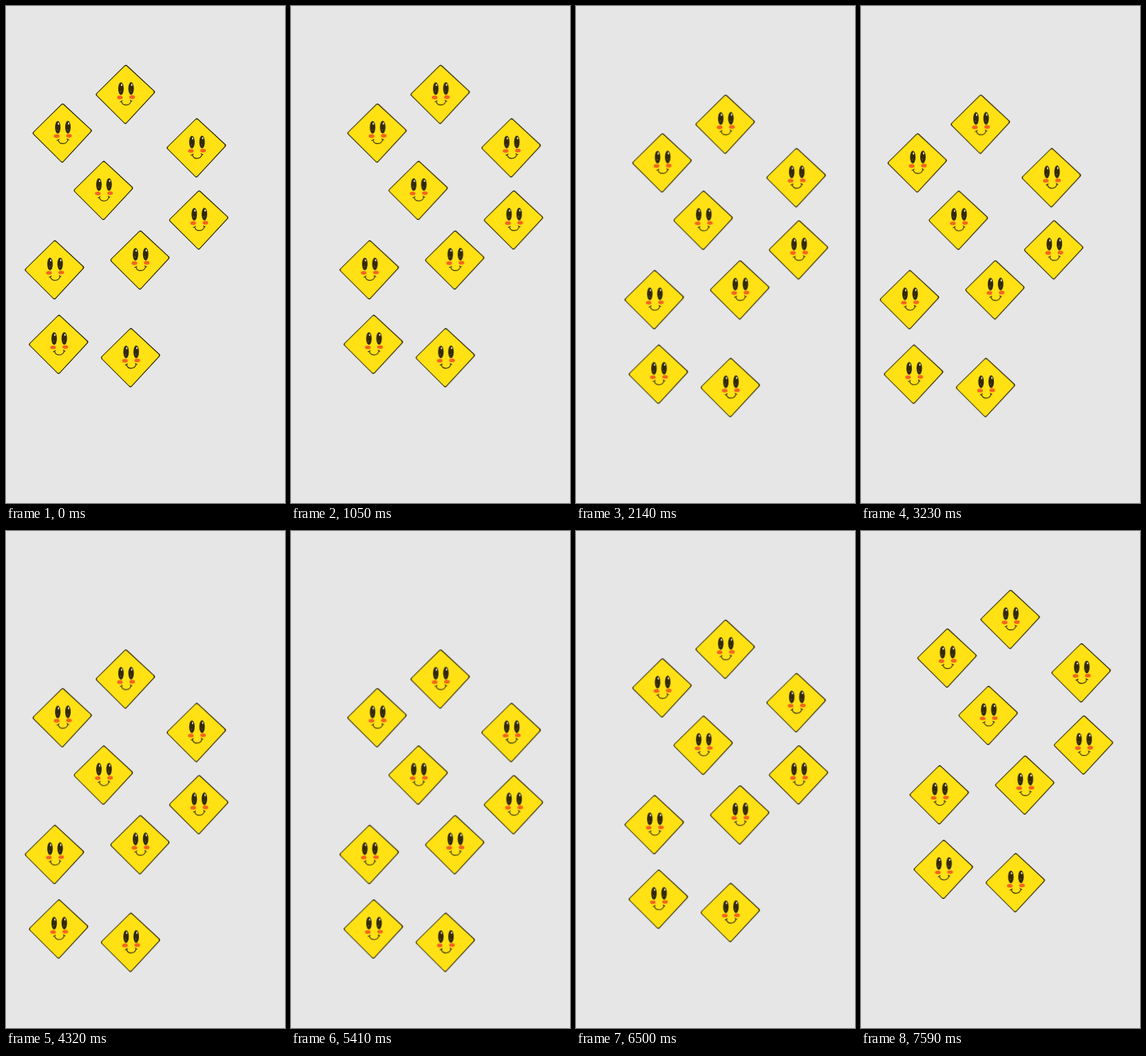
Animation of 405 by 720 pixels, one loop 8680 ms. Source, as an HTML page:

```html
<!DOCTYPE html>
<html lang="en">
<head>
<meta charset="utf-8">
<title>Hopping diamonds</title>
<style>
  html, body { margin: 0; width: 100%; height: 100%; overflow: hidden; background: #e6e6e6; }
  svg { display: block; width: 405px; height: 720px; }
  #flock { animation: hop 8680ms step-end infinite; }
  @keyframes hop {
    0%       { transform: translate(0, 0); }
    12.096%  { transform: translate(43.2px, 0); }
    24.654%  { transform: translate(43.2px, 43.2px); }
    37.211%  { transform: translate(0, 43.2px); }
    49.769%  { transform: translate(0, 86.4px); }
    62.327%  { transform: translate(43.2px, 86.4px); }
    74.884%  { transform: translate(43.2px, 43.2px); }
    87.442%  { transform: translate(43.2px, 0); }
    100%     { transform: translate(0, 0); }
  }
</style>
</head>
<body>
<svg viewBox="0 0 405 720">
  <defs>
    <g id="eye">
      <ellipse rx="4" ry="9.2" fill="#332a06"/>
      <ellipse cx="1" cy="-5.3" rx=".9" ry="1.6" fill="#fff"/>
      <circle cx="-.6" cy="3.8" r=".5" fill="#b5aa78"/>
    </g>
    <path id="tile" d="M42 1.2Q43.9 -.6 45.8 1.2L85.6 38Q87.2 39.7 85.6 41.4L45 85.2Q43.2 87 41.4 85.2L1 45Q-.7 43.2 1 41.5Z"/>
    <g id="diamond">
      <use href="#tile" fill="#2c250a"/>
      <use href="#tile" fill="#ffe114" transform="translate(1.45 1.6) scale(.963)"/>
      <use href="#eye" x="36.8" y="34.8"/>
      <use href="#eye" x="51.5" y="34.6"/>
      <g fill="#f4641f">
        <ellipse cx="35.2" cy="47.6" rx="4.1" ry="2.7"/>
        <ellipse cx="53" cy="47.1" rx="4.1" ry="2.7"/>
      </g>
      <path d="M37.4 53.2C39 60.3 49.6 60.6 51.5 52.4M35.6 53.8Q37.3 53.8 38.7 52.2M50.2 51.6Q51.2 53 52.8 53" fill="none" stroke="#332a06" stroke-width="1.15" stroke-linecap="round"/>
    </g>
  </defs>
  <g id="flock">
    <use href="#diamond" x="130.1" y="84.9"/>
    <use href="#diamond" x="38.4" y="140.9"/>
    <use href="#diamond" x="233.1" y="162.3"/>
    <use href="#diamond" x="98.1" y="224"/>
    <use href="#diamond" x="236.5" y="266.9"/>
    <use href="#diamond" x="27.1" y="339"/>
    <use href="#diamond" x="151.2" y="324.9"/>
    <use href="#diamond" x="33.1" y="447"/>
    <use href="#diamond" x="137.5" y="466.3"/>
  </g>
</svg>
</body>
</html>
```
